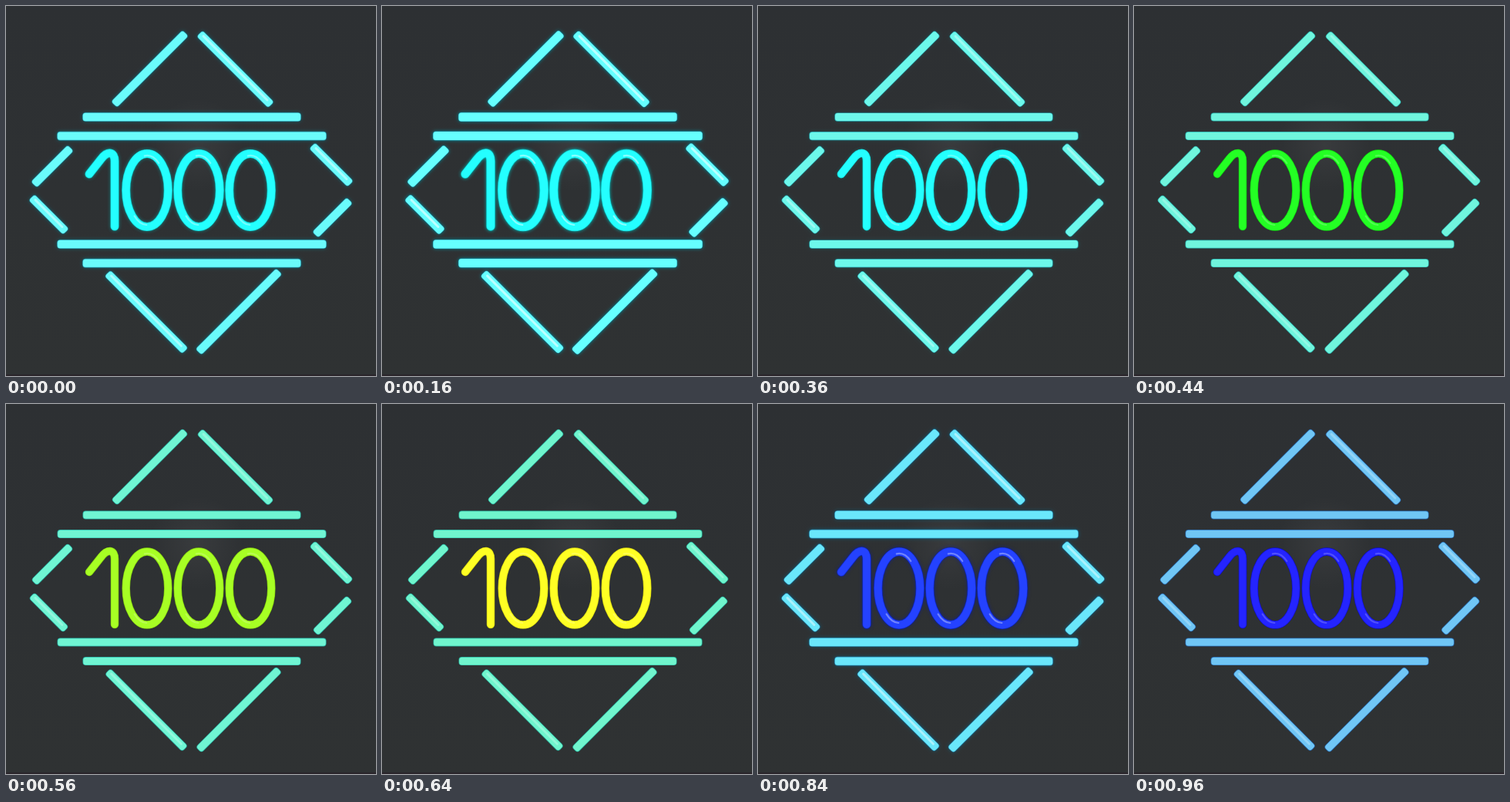
Recreate the animation shown at these times as an HTML page with a canvas. Size 480x480 px, loop 1000 ms.

```html
<!DOCTYPE html>
<html lang="en">
<head>
<meta charset="utf-8">
<title>Neon 1000</title>
<style>
html, body { margin: 0; height: 100%; overflow: hidden; background: #2e3133; }
canvas { display: block; }
</style>
</head>
<body>
<canvas id="stage" width="480" height="480"></canvas>
<script>
const ctx = document.getElementById('stage').getContext('2d');
const LOOP = 1000, STEP = 40, CX = 241, CY = 238.8;

// time, digit hue, bar hue, glow
const keys = [
  [0, 180, 180, .6], [160, 180, 180, 1], [280, 240, 180, .5],
  [440, 120, 169, 0], [640, 60, 162, 0], [760, 226, 180, 1], [960, 240, 201, 0]
];

// centre x, centre y, half extent of the slanted bars
const slants = [
  [186.5, 81.5, 46], [297.5, 82, 46], [182, 397, 50], [302, 396.5, 52],
  [60, 208, 23.5], [55.5, 270.5, 22], [422, 206, 24.5], [423.5, 274.5, 22]
];

const hsl = (h, s, l, a = 1) => `hsla(${h},${s}%,${l}%,${a})`;

function stateAt(t) {
  const i = Math.max(1, keys.findIndex(k => k[0] >= t));
  const a = keys[i - 1], b = keys[i];
  const p = (t - a[0]) / (b[0] - a[0]);
  return a.map((v, j) => v + (b[j] - v) * p);
}

function background() {
  const g = ctx.createLinearGradient(0, 0, 0, 480);
  g.addColorStop(0, '#2d3033');
  g.addColorStop(1, '#2f3233');
  ctx.fillStyle = g;
  ctx.fillRect(0, 0, 480, 480);
  const haze = ctx.createRadialGradient(248, 180, 0, 248, 180, 60);
  haze.addColorStop(0, 'rgba(85,85,88,.28)');
  haze.addColorStop(1, 'rgba(85,85,88,0)');
  ctx.fillStyle = haze;
  ctx.fillRect(180, 120, 136, 120);
  ctx.fillStyle = '#2a252b';
  ctx.fillRect(0, 478, 480, 2);
}

function bar(x, y, length, angle, hue, power) {
  const slab = (grow, radius) => {
    const w = length + grow, h = 10 + grow;
    ctx.beginPath();
    ctx.roundRect(-w / 2, -h / 2, w, h, radius);
    ctx.fill();
  };
  ctx.save();
  ctx.translate(x, y);
  ctx.rotate(angle);
  ctx.shadowColor = hsl(hue + 6, 100, 28, power);
  ctx.shadowBlur = 4;
  ctx.fillStyle = hsl(hue + 10, 65, 42);
  slab(1 + power, 4);
  ctx.shadowBlur = 0;
  ctx.fillStyle = hsl(hue, 87 + 13 * power, 70);
  slab(power * 1.4 - .4, 3.5);
  if (angle > 0) {
    ctx.fillStyle = `rgba(255,255,255,${.25 + .3 * power})`;
    ctx.beginPath();
    ctx.roundRect(4 - length / 2, -2.5, length - 10, 3, 1.5);
    ctx.fill();
  }
  ctx.restore();
}

function bars(hue, power) {
  for (const side of [-1, 1]) {
    bar(CX, CY + side * 70.2, 348, 0, hue, power);
    bar(CX, CY + side * 94.8, 282, 0, hue, power);
  }
  for (const [x, y, half] of slants) {
    const falling = (x < CX) !== (y < CY);
    bar(x, y, half * Math.SQRT2 * 2, (falling ? 1 : -1) * Math.PI / 4, hue, power);
  }
}

function tube(color, width) {
  ctx.strokeStyle = color;
  ctx.lineWidth = width;
  ctx.stroke();
}

function digits(hue, power) {
  const zeros = [183, 250, 317];
  ctx.save();
  ctx.lineCap = ctx.lineJoin = 'round';
  ctx.beginPath();
  ctx.moveTo(108, 218);
  ctx.lineTo(123, 199);
  ctx.bezierCurveTo(132, 187, 141, 189, 141, 201);
  ctx.lineTo(141, 286);
  for (const x of zeros) {
    ctx.moveTo(x + 27.3, 239);
    ctx.ellipse(x, 239, 27.3, 47.5, 0, 0, 2 * Math.PI);
  }
  ctx.shadowColor = hsl(hue, 100, 35, power);
  ctx.shadowBlur = 4;
  tube(hsl(hue, 90, 42), 10.5 + power);
  ctx.shadowBlur = 0;
  tube(hsl(hue, 100, 57), 9.2 + power);

  // soft reflections on the inner rim
  for (const x of zeros) {
    for (const [from, to] of [[-1.7, -.9], [1.6, 2.3]]) {
      ctx.beginPath();
      ctx.ellipse(x, 239, 24.5, 45, 0, from, to);
      tube(`rgba(255,255,255,${.2 + .25 * power})`, 2.2);
    }
  }
  ctx.restore();
}

function draw(now) {
  const t = Math.floor(now % LOOP / STEP) * STEP;
  const [, digitHue, barHue, power] = stateAt(t);
  background();
  bars(barHue, power);
  digits(digitHue, power);
  requestAnimationFrame(draw);
}
requestAnimationFrame(draw);
</script>
</body>
</html>
```
